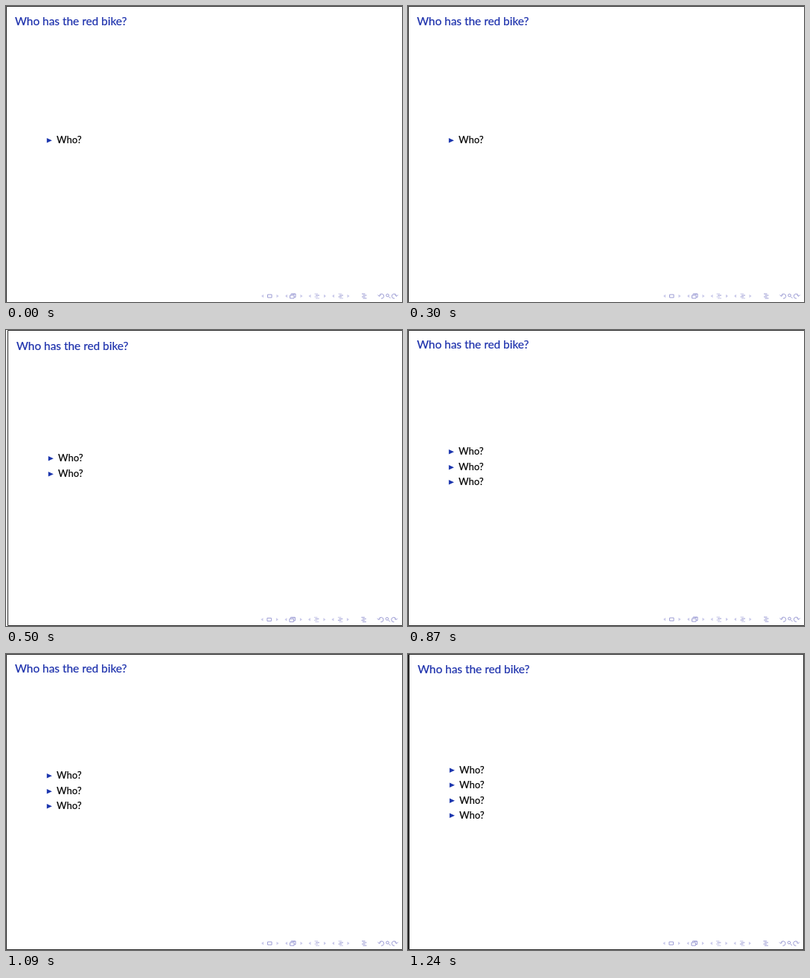
Animation, 532 px wide and 399 px high, one loop 1610 ms. Source, as an HTML page:

```html
<!DOCTYPE html>
<html lang="en">
<head>
<meta charset="utf-8">
<style>
  html, body { margin: 0; width: 100%; height: 100%; overflow: hidden; background: #fff; }
  svg { display: block; width: 532px; height: 399px; }
  text { font-family: Lato, "Open Sans", sans-serif; white-space: pre; stroke-width: .2px; }
  .title { font-size: 15.4px; fill: #1c30ac; stroke: #1c30ac; }
  .item { font-size: 13px; fill: #000; stroke: #000; }
  .bullet { fill: #1c36ae; }
  .border { fill: none; stroke: #262626; }
  .arrow { fill: #c9c9ea; }
  .icon { fill: none; stroke: #c4c4e6; }
  .strong { stroke: #9c9cd4; }
</style>
</head>
<body>
<svg id="stage" viewBox="0 0 532 399"></svg>
<script>
const LOOP = 1610;

// Each slide: start time, left edge, title baseline, item baselines, border path, toolbar shift.
const slides = [
  { start: 0, left: 0, title: 26, rows: [185],
    border: "M.5 399V.5H532", nav: [0, 391] },
  { start: 500, left: 2, title: 27, rows: [177, 198],
    border: "M532 .5H2.5V398.5H532", nav: [-.6, 390.3] },
  { start: 870, left: 0, title: 25, rows: [168, 189, 209],
    border: "M532 .5H.5V398.5H532", nav: [0, 390] },
  { start: 1240, left: 1, title: 26, rows: [160.5, 180.5, 201.5, 221.5],
    border: "M.5 .5H531.5V398.5H.5ZM1.5 0V399", nav: [-.6, 390] }
];

const path = (cls, d) => `<path class="${cls}" d="${d}"/>`;
const text = (cls, x, y, s) => `<text class="${cls}" x="${x}" y="${y}">${s}</text>`;

// Stacked rules; those from firstStrong to lastStrong are darker.
const outline = (x, firstStrong, lastStrong) => [-3, -1, 1, 3].map((y, i) =>
  path(i >= firstStrong && i <= lastStrong ? "icon strong" : "icon",
    `M${x + (i % 2 ? 1.5 : 0)} ${y}h${i % 2 ? 5 : 4.5}`)).join("");

const arrows = [343, 375, 406.5, 438].map(x =>
  path("arrow", `M${x} 0l3-2.2v4.4zM${x + 23.5} 0l-3-2.2v4.4z`)).join("");

const toolbar = arrows
  + path("icon strong", "M351.5-2h5.5v4h-5.5z")
  + path("icon strong", "M381.5-1h5.5v4h-5.5zM383-1.5v-1.5h6v4.5h-1.5M384.5-2.5h4")
  + outline(414.5, 1, 1) + outline(446.5, 1, 2) + outline(478, 0, 3)
  + path("icon strong", "M501.5-.5A3.1 3.1 0 1 1 504 3.2M499.5-1.5l2 2 2-2")
  + '<circle class="icon strong" cx="512.5" cy="-1" r="1.8"/>'
  + path("icon strong", "M514 .5l2.5 2.5")
  + path("icon strong", "M524.5-.5A3.1 3.1 0 1 0 522 3.2M526.5-1.5l-2 2-2-2");

const drawSlide = ({ left, title, rows, border, nav }) =>
  path("border", border)
  + text("title", left + 12, title, "Who has the red bike?")
  + rows.map(y =>
      path("bullet", `M${left + 54.8} ${y - 7.1}l7 3.3-7 3.3z`)
      + text("item", left + 68, y, "Who?")).join("")
  + `<g transform="translate(${nav})">${toolbar}</g>`;

const stage = document.getElementById("stage");
let shown;

function render() {
  const time = performance.now() % LOOP;
  const slide = slides.findLast(s => time >= s.start);
  if (slide !== shown) stage.innerHTML = drawSlide(shown = slide);
  requestAnimationFrame(render);
}
render();
</script>
</body>
</html>
```
